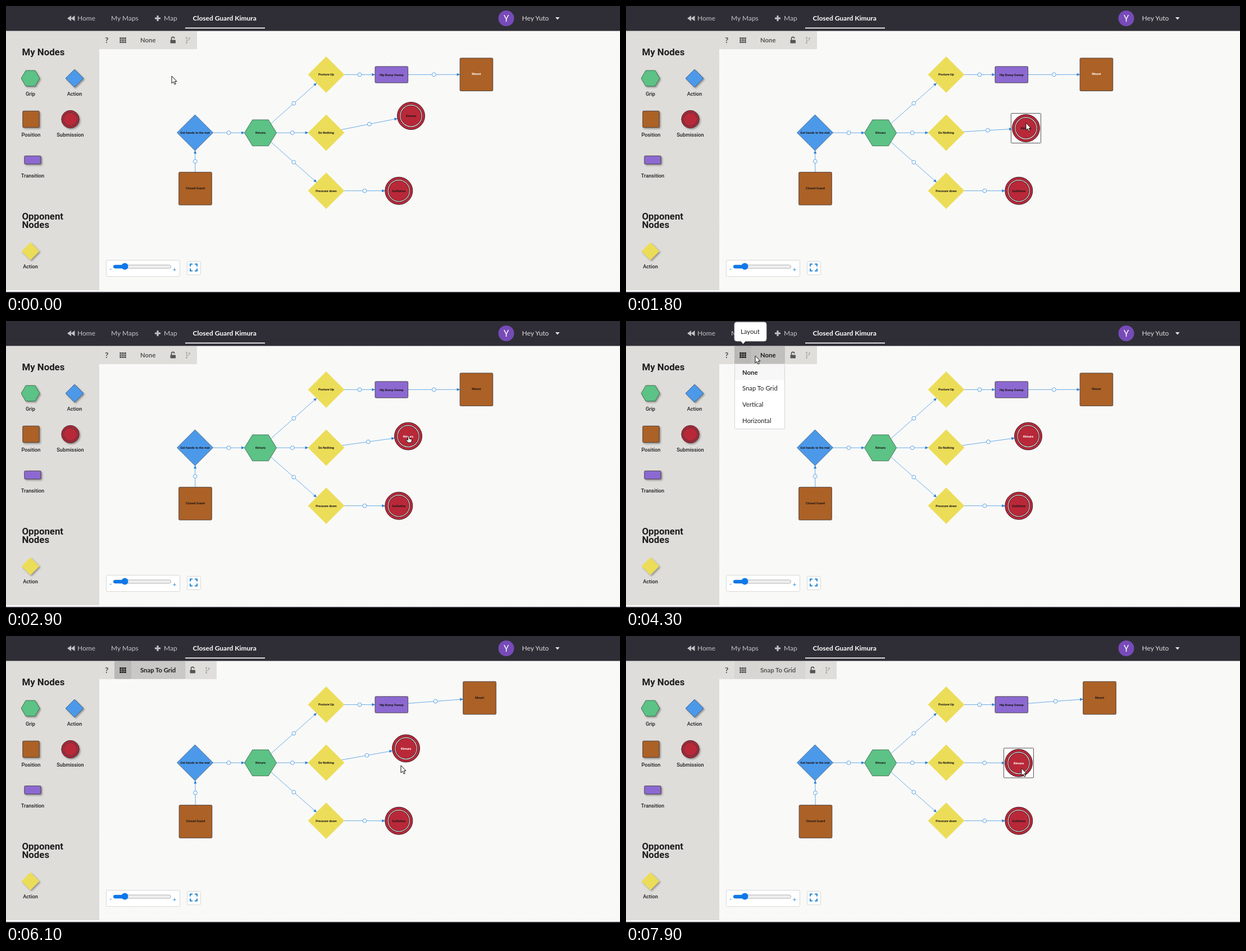
These frames come from a looping animation (1093x512 px, 8 s). An HTML page:

```html
<!DOCTYPE html>
<html lang="en">
<head>
<meta charset="utf-8">
<title>Node map editor</title>
<style>
  html, body { margin: 0; width: 100%; height: 100%; overflow: hidden; background: #f9f9f8; }
  svg { display: block; width: 100vw; height: 100vh; }
  text { font-family: Lato, sans-serif; font-size: 12px; }
  .head text { fill: #c2c2c5; }
  .side text { font: 500 9.2px Roboto, sans-serif; fill: #1d1d1d; text-anchor: middle; }
  .side .title { font-size: 16.8px; font-weight: 700; text-anchor: start; }
  .side .icon { filter: drop-shadow(2px 2px 1.5px #0005); }
  .label { font: 700 5.6px Roboto, sans-serif; text-anchor: middle; }
  .tool { font-size: 11.3px; }
  .bold { font-weight: 700; }
</style>
</head>
<body>
<svg viewBox="0 0 1093 512" xmlns="http://www.w3.org/2000/svg">
  <defs>
    <pattern id="dots" x="4" y="5" width="13" height="13" patternUnits="userSpaceOnUse">
      <rect x="6" y="6" width="1" height="1" fill="#eeeeec"/>
    </pattern>
  </defs>
  <rect width="1093" height="512" fill="#f9f9f8"/>
  <rect x="166" y="45" width="927" height="462" fill="url(#dots)"/>
  <g id="graph"></g>
  <g class="side">
    <rect y="45" width="166" height="462" fill="#dfddda"/>
    <text class="title" x="28.5" y="87.5">My Nodes</text>
    <text class="title" x="28.5" y="381">Opponent</text>
    <text class="title" x="28.5" y="396">Nodes</text>
    <g id="palette"></g>
  </g>
  <g fill="none" stroke="#d8d8d8">
    <rect x="178.5" y="453.5" width="131" height="29" rx="2" fill="#fff"/>
    <rect x="322.5" y="455.5" width="24" height="24" rx="2" fill="#fff"/>
    <rect x="191.5" y="462" width="102" height="6" rx="3" fill="#efefef" stroke="#b2b2b2"/>
    <path d="M194 465H211" stroke="#0e78ea" stroke-width="6" stroke-linecap="round"/>
    <rect x="328" y="460.5" width="12" height="12" stroke="#2185d0" stroke-width="2" stroke-dasharray="4 4" stroke-dashoffset="0" pathLength="48" id="corners"/>
  </g>
  <circle cx="211.5" cy="464.5" r="6" fill="#0e78ea"/>
  <text x="184" y="473" fill="#2185d0">-</text>
  <text x="296.5" y="473.5" fill="#2185d0">+</text>
  <rect y="510" width="1093" height="2" fill="#2d2c34"/>
  <g class="head">
    <rect width="1093" height="44.5" fill="#2f2e36"/>
    <path d="M116 17v10l-7-5zm6.5 0v10l-7-5z" fill="#c2c2c5"/>
    <path d="M265 22h10M270 17v10" stroke="#c2c2c5" stroke-width="3"/>
    <text x="127" y="26">Home</text>
    <text x="187" y="26">My Maps</text>
    <text x="281" y="26">Map</text>
    <text class="bold" x="332.5" y="26" style="fill:#fff">Closed Guard Kimura</text>
    <rect x="319" y="38.5" width="142" height="1.7" fill="#fff"/>
    <circle cx="890.5" cy="22" r="14" fill="#774bb8"/>
    <text x="890.5" y="27.5" text-anchor="middle" style="font:16px Roboto,sans-serif;fill:#fff">Y</text>
    <text x="918.5" y="26" style="fill:#dededf">Hey Yuto</text>
    <path d="M978 20h7.5l-3.8 4.5z" fill="#e8e8e8"/>
  </g>
  <g id="bar"></g>
  <g id="cursor"></g>
</svg>
<script>
const LOOP = 8000, STEP = 100, GRID = 13;
const byId = id => document.getElementById(id);
const BLUE = '#4c99ea', GREEN = '#5cc285', BROWN = '#ac6126',
      RED = '#b92838', PURPLE = '#8c69d1', YELLOW = '#ecdd58';

// Pointer stops: time, x, y
const FREE_DRAG = [
  [0, 295, 125], [200, 430, 140], [400, 573, 160], [500, 573, 160], [800, 721, 187],
  [900, 722, 130], [1000, 705, 172], [1100, 722, 243], [1200, 734, 214.5], [1400, 718, 230],
  [1600, 640, 252], [1800, 712, 208.5], [2000, 690, 235], [2400, 716, 196]
];
const LAYOUT_MENU = [
  [2700, 717, 205], [2900, 717, 205], [3200, 350, 84], [3400, 274, 72],
  [3600, 230, 64], [4300, 230, 62], [4600, 229, 122], [5200, 232, 117]
];
const GRID_DRAG = [
  [5600, 240, 130], [6000, 670, 262], [6100, 703, 231], [6200, 717, 210], [6500, 704, 249],
  [6700, 678, 236], [6900, 717, 210], [7200, 704, 249], [7400, 626, 236],
  [7600, 717, 210], [7700, 709, 239], [7900, 704, 236]
];
const pointer = FREE_DRAG.concat(LAYOUT_MENU, GRID_DRAG);

function pointerAt(t) {
  const i = pointer.findIndex(p => p[0] > t);
  if (i < 0) return pointer.at(-1).slice(1);
  const [a, b] = [pointer[i - 1], pointer[i]];
  const k = (t - a[0]) / (b[0] - a[0]);
  return [a[1] + (b[1] - a[1]) * k, a[2] + (b[2] - a[2]) * k];
}

const snap = (v, origin) => origin + Math.round((v - origin) / GRID) * GRID;

function draggedNode(t) {
  if (t < 900) return [721, 196];
  const [x, y] = pointerAt(t);
  if (t < 2400) return [x, y + 9.5];
  if (t < 5300) return [716, 205.5];
  if (t < 6300) return [712, 200.5];
  return [snap(x - 5, 699), snap(y - 10, 226.5)];
}

const polygon = (points, fill, stroke) =>
  `<polygon points="${points}" fill="${fill}" stroke="${stroke}" stroke-width=".8"/>`;

// Each kind has a drawing and the fraction of a ray (dx, dy) lying inside it.
const kinds = {
  diamond: {
    draw: ({x, y, w, fill}) => polygon([x - w, y, x, y - w, x + w, y, x, y + w], fill, fill === YELLOW ? fill : '#31506f'),
    inside: ({w}, dx, dy) => w / (Math.abs(dx) + Math.abs(dy))
  },
  hexagon: {
    draw: ({x, y, w, h, fill}) => polygon([x - w, y, x - w / 2, y - h, x + w / 2, y - h, x + w, y, x + w / 2, y + h, x - w / 2, y + h], fill, '#2f5b41'),
    inside: ({w, h}, dx, dy) => Math.min(w / (Math.abs(dx) + Math.abs(dy) * w / h / 2), h / Math.abs(dy))
  },
  box: {
    draw: ({x, y, w, h = w, fill}) => `<rect x="${x - w}" y="${y - h}" width="${2 * w}" height="${2 * h}" rx="1.5" fill="${fill}" stroke="#463a3a" stroke-width=".9"/>`,
    inside: ({w, h = w}, dx, dy) => Math.min(w / Math.abs(dx), h / Math.abs(dy))
  },
  ring: {
    draw({x, y, w, fill, ring = '#f0e4e4'}) {
      const circle = (r, style) => `<circle cx="${x}" cy="${y}" r="${r}" ${style}/>`;
      return circle(w, `fill="${fill}" stroke="#40232a"`) +
        circle(w * .78, `fill="none" stroke="#40232a" stroke-width="${w / 9}"`) +
        circle(w * .78, `fill="none" stroke="${ring}" stroke-width="${w / 22}"`);
    },
    inside: ({w}, dx, dy) => w / Math.hypot(dx, dy)
  }
};

const node = (kind, x, y, w, fill, text, more) => ({kind, x, y, w, fill, text, ...more});
const drawShape = n => kinds[n.kind].draw(n);
const drawNode = n => drawShape(n) +
  `<text class="label" x="${n.x}" y="${n.y + (n.rise ?? 2)}" fill="${n.ink || '#1b1717'}">${n.text}</text>`;

function drawEdge(a, b) {
  const dx = b.x - a.x, dy = b.y - a.y;
  const s = kinds[a.kind].inside(a, dx, dy), e = 1 - kinds[b.kind].inside(b, dx, dy);
  const at = k => [a.x + dx * k, a.y + dy * k];
  const [p, m, q] = [at(s), at((s + e) / 2), at(e)];
  const angle = Math.atan2(dy, dx) * 180 / Math.PI;
  return `<path d="M${p}L${q}" stroke="#58a3e3" stroke-width=".9"/>
    <path d="M0 0L-5.5 -2.6V2.6Z" fill="#2680d3" transform="translate(${q}) rotate(${angle})"/>
    <circle cx="${m[0]}" cy="${m[1]}" r="3.4" fill="#fff" stroke="#4a9ae0" stroke-width=".9"/>`;
}

function drawGraph(t) {
  const snapped = t >= 5300, picked = t >= 2600;
  const [x, y] = draggedNode(t);
  const closed = node('box', snapped ? 337.5 : 337, snapped ? 331 : 325.7, 29.3, BROWN, 'Closed Guard', {rise: 1});
  const hands = node('diamond', 336.5, 226, 32, BLUE, 'Get hands to the mat');
  const grip = node('hexagon', 453, 226.3, 28.5, GREEN, 'Kimura', {h: 23.3});
  const [posture, nothing, pressure] = ['Posture Up', 'Do Nothing', 'Pressure down']
    .map((text, i) => node('diamond', 570, 122.4 + i * 103.6, 32, YELLOW, text));
  const sweep = node('box', 686.3, 122.5, 29.3, PURPLE, 'Hip Bump Sweep', {h: 14.6});
  const mount = node('box', snapped ? 843 : 837.4, snapped ? 110.5 : 122.2, 29.3, BROWN, 'Mount', {ink: picked ? '' : '#fff', rise: 1});
  const kimura = node('ring', x, y, 24.5, RED, 'Kimura', {ink: picked ? '#fff' : ''});
  const choke = node('ring', 699.3, 329.7, 24.5, RED, 'Guillotine');
  const edges = [[closed, hands], [hands, grip], [grip, posture], [grip, nothing], [grip, pressure],
    [posture, sweep], [sweep, mount], [nothing, kimura], [pressure, choke]];
  const selected = t >= 900 && t < 2600 || t >= 6300;
  const frame = `<rect x="${x - 26.5}" y="${y - 26.5}" width="53" height="53" rx="1" fill="#fdfdfd" stroke="#555"/>`;
  return edges.map(e => drawEdge(...e)).join('') + (selected ? frame : '') +
    [closed, hands, grip, posture, nothing, pressure, sweep, mount, choke, kimura].map(drawNode).join('');
}

const rect = (x, y, w, h, fill, more = '') =>
  `<rect x="${x}" y="${y}" width="${w}" height="${h}" fill="${fill}" ${more}/>`;

function drawBar(t) {
  const snapped = t >= 5300, hover = t >= 3300 && !snapped, open = t >= 3800 && !snapped;
  const shift = snapped ? 35 : 0;
  const active = hover || snapped && t < 6300;
  const ink = active ? '#1c1c1c' : '#555553';
  let out = rect(166, 45, 174 + shift, 32, '#dfdedb');
  if (active || snapped)
    out += rect(193, 45, 90 + shift * 1.04, 31.5, active ? (snapped ? '#c9c8c6' : '#c0bfbd') : '#d7d6d3', 'rx="2"');
  if (active) out += rect(193, 45, 30, 31.5, '#b9b8b6', 'rx="2"');
  for (let i = 0; i < 9; i++)
    out += rect(202.3 + i % 3 * 4.1, 56 + Math.floor(i / 3) * 3.6, 3.3, 2.8, ink);
  out += `<text class="bold" x="176" y="65.5" style="font-size:14px" fill="#4d4d4b">?</text>
    <text class="tool bold" x="239" y="64.5" fill="${ink}">${snapped ? 'Snap To Grid' : 'None'}</text>
    <g transform="translate(${shift})" fill="none" stroke="#b1b0ad">
      <path d="M294.5 61v-3a2.6 2.6 0 0 1 5.2 0" stroke="#555553" stroke-width="1.6"/>
      <rect x="292.5" y="60.5" width="9.5" height="6" rx="1" fill="#555553" stroke="none"/>
      <path d="M321.5 57v8M326.5 58q0 3 -5 4" stroke-width="1.2"/>
      <path d="M321.5 56.500h.01m0 9h.01m5-8h.01" stroke-width="3.2" stroke-linecap="round"/>
    </g>`;
  if (hover)
    out += rect(193, 2, 57, 34, '#fff', 'rx="4" stroke="#d4d4d5" stroke-width=".8"') +
      `<path d="M204 35.5h9l-4.5 5.5z" fill="#fff"/><text class="tool" x="204" y="23" fill="#222">Layout</text>`;
  if (open) {
    out += rect(193.5, 76.5, 89, 116, '#fff', 'rx="2" stroke="#d5d5d5"') + rect(194, 77, 88, 28.5, '#f7f7f7');
    if (t >= 4500) out += rect(194, 105.5, 88, 29, '#f2f2f2');
    ['None', 'Snap To Grid', 'Vertical', 'Horizontal'].forEach((item, i) => {
      out += `<text class="tool${i ? '' : ' bold'}" x="207" y="${95.5 + i * 28.8}" fill="#222">${item}</text>`;
    });
  }
  return out;
}

function drawCursor(t) {
  const hand = t >= 2600 && t < 3000;
  const shape = hand
    ? 'M-1.5 1q1.2-2 2.5 0v4l4 1q1 .5 .5 2l-1 4h-6l-3-4q0-2 1.5-1.500l1.500 1.500z'
    : 'M0 0v13l3-2.7 2.2 4.7 2.1-1-2.1-4.5H9z';
  return `<path d="${shape}" transform="translate(${pointerAt(t)})" fill="#fff" stroke="#111" stroke-linejoin="round"/>`;
}

// Dashes centred on the four corners of the full-screen icon.
byId('corners').setAttribute('stroke-dasharray', '8 4');
byId('corners').setAttribute('stroke-dashoffset', 4);

byId('palette').innerHTML = [
  [node('hexagon', 43.5, 129, 16.5, GREEN, 'Grip', {h: 14}), 159.5],
  [node('diamond', 122, 129, 16, BLUE, 'Action'), 159.5],
  [node('box', 44.5, 202, 14.7, BROWN, 'Position'), 232.5],
  [node('ring', 114.5, 202, 15.7, RED, 'Submission', {ring: '#c5505c'}), 232.5],
  [node('box', 47.5, 274.7, 14.7, PURPLE, 'Transition', {h: 7.3}), 305.5],
  [node('diamond', 43.5, 437.5, 15.5, YELLOW, 'Action'), 468]
].map(([n, y]) => `<g class="icon">${drawShape(n)}</g><text x="${n.x}" y="${y}">${n.text}</text>`).join('');

let shown = -1;
function tick() {
  const t = Math.floor(performance.now() % LOOP / STEP) * STEP;
  if (t !== shown) {
    shown = t;
    byId('graph').innerHTML = drawGraph(t);
    byId('bar').innerHTML = drawBar(t);
    byId('cursor').innerHTML = drawCursor(t);
  }
  requestAnimationFrame(tick);
}
tick();
</script>
</body>
</html>
```
